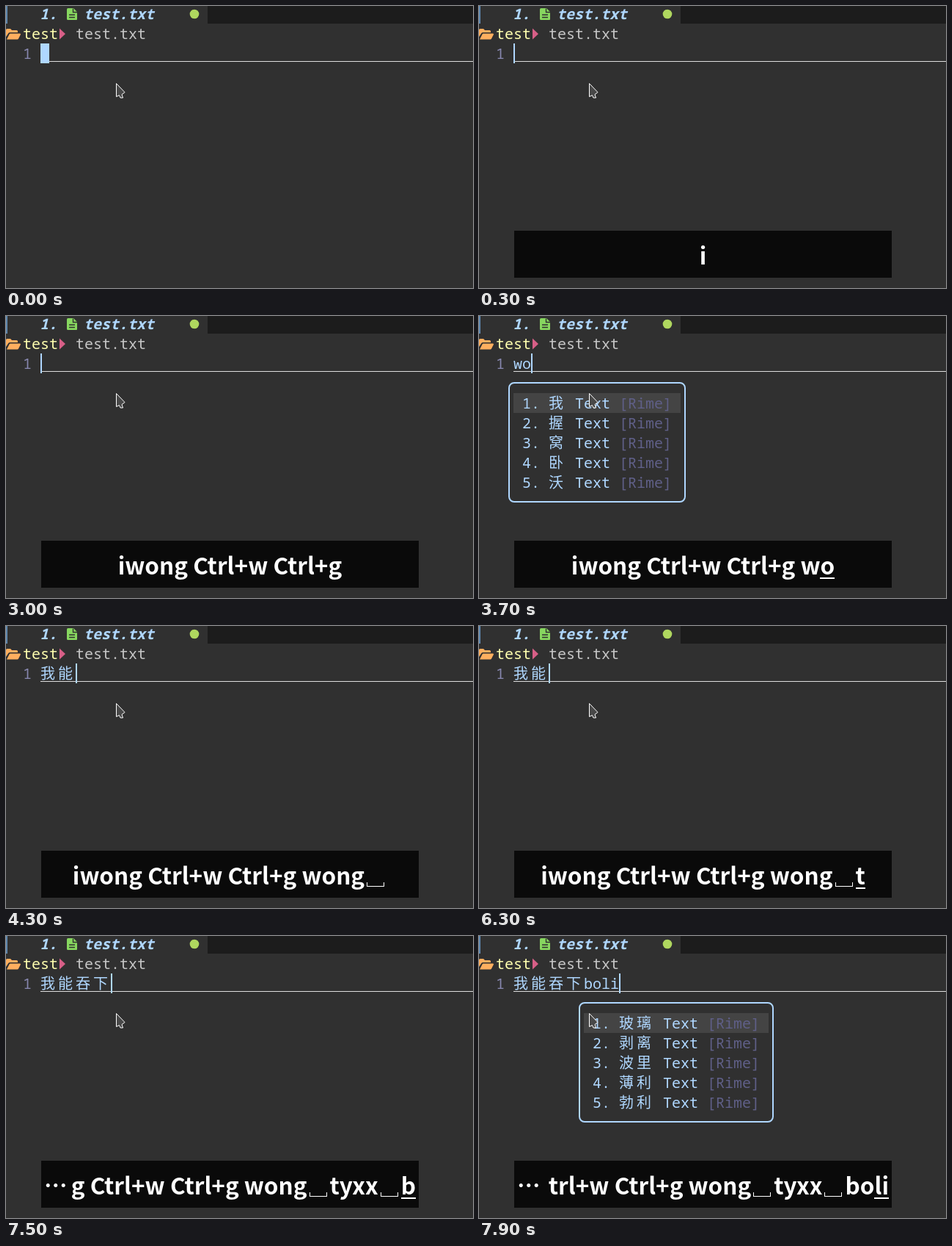
An HTML page that plays this animation: 637x384 px, repeating every 8 s.

```html
<!DOCTYPE html>
<html lang="en">
<head>
<meta charset="utf-8">
<title>Typing Chinese in an editor</title>
<style>
  html, body { margin: 0; width: 100%; height: 100%; overflow: hidden; background: #303030; }
  #stage {
    position: relative; width: 637px; height: 384px; overflow: hidden;
    background: #303030; color: #afd7ff;
    font: 20px/27px "Noto Sans Mono", "Noto Sans CJK SC", monospace;
  }
  #stage > * { position: absolute; white-space: pre; }
  .tabs { left: 275px; right: 0; top: 0; height: 24px; background: #1c1c1c; }
  .edge { left: 0; top: 0; width: 2px; height: 24px; background: #5f87af; }
  .tab { top: -3px; font-weight: bold; font-style: italic; }
  .path { top: 24px; }
  .num { left: 23px; top: 51px; color: #8787af; }
  .rule { left: 47px; right: 0; top: 75px; height: 1px; background: #dedede; }
  #line { left: 47px; top: 51px; height: 27px; }
  #caret { top: 51px; height: 27px; background: #afd7ff; }
  .han { letter-spacing: 4px; font-family: "Noto Sans CJK SC", sans-serif; line-height: 0; }
  #menu {
    top: 90px; height: 135px; padding: 13px 5px 12px; background: #303030;
    border: 2px solid #afd7ff; border-radius: 8px;
  }
  #menu div { height: 27px; }
  #menu div:first-child { background: #444; }
  #menu i { font-style: normal; color: #5f5f87; }
  #keys {
    left: 48px; top: 306px; width: 507px; height: 64px; padding: 0 4px;
    color: #fff; text-align: center;
    font: bold 31.5px/64px "Noto Sans CJK SC", sans-serif;
  }
  #keys.shown { background: #0a0a0a; }
  #keys.cut { text-align: right; }
  #keys.cut::before { content: "…"; position: absolute; left: 4px; }
  .hot { background: linear-gradient(#fff, #fff) 0 41px / 100% 2px no-repeat; }
  .gap {
    display: inline-block; box-sizing: border-box; width: 24px; height: 6px;
    margin: 0 4px -3px 3px; border: 1px solid #fff; border-top: 0;
  }
  svg { left: 0; top: 0; }
</style>
</head>
<body>
<div id="stage">
  <div class="tabs"></div>
  <div class="edge"></div>
  <div class="tab" style="left:46px">1.</div>
  <div class="tab" style="left:106px">test.txt</div>
  <div class="path" style="left:23px;color:#ffffaf">test</div>
  <div class="path" style="left:95px;color:#c6c6c6">test.txt</div>
  <div class="num">1</div>
  <div id="line"></div>
  <div class="rule"></div>
  <div id="caret"></div>
  <div id="menu"></div>
  <div id="keys"></div>
  <svg width="637" height="384">
    <circle cx="257" cy="11" r="6.3" fill="#afd75f"/>
    <path d="M84.5 3H92L97 8V18Q97 19 96 19H84.5Q83 19 83 17.5V4.5Q83 3 84.5 3Z" fill="#87d75f"/>
    <path d="M91.5 3.5V8.5H97M86 12H94M86 15.5H94" fill="none" stroke="#303030" stroke-width="1.4"/>
    <path d="M0 42V32.5Q0 31 1.5 31H6L8 33H14.5Q16 33 16 34.5V36H5.5Q4 36 3.3 37ZM1 45.5 4.5 38.5Q5 37.5 6 37.5H19Q20.5 37.5 19.8 39L17 44.5Q16.5 45.5 15.5 45.5Z" fill="#ffaf5f"/>
    <path d="M73 30.5 81 38 73 45.5Z" fill="#d75f87"/>
    <path d="M150.5 105.5V123.5L154.5 121.5 156 125H159.5L158 120.5 162 117.5Z" fill="#484848" stroke="#fff"/>
  </svg>
</div>
<script>
const LOOP = 8000, STEP = 100, HOLD = 200, CELL = 12, LEFT = 47;
const $ = id => document.getElementById(id);

// [time, key, starts a new group]
const keys = [
  [100, "i"], [1000, "w"], [1100, "o"], [1200, "n"], [1300, "g"],
  [2400, "Ctrl+w", 1], [2800, "Ctrl+g", 1],
  [3500, "w", 1], [3700, "o"], [3800, "n"], [3900, "g"], [4100, "␣"],
  [6300, "t"], [6500, "y"], [6700, "x"], [6900, "x"], [7100, "␣"],
  [7500, "b"], [7700, "o"], [7800, "l"], [7900, "i"]
];

// [time, committed text, pending input, candidates]
const edits = [
  [0, "", ""], [1100, "", "w"], [1200, "", "wo"], [1300, "", "won"], [1400, "", "wong"],
  [2500, "", ""],
  [3600, "", "w", "我 为 无 问 万"],
  [3700, "", "wo", "我 握 窝 卧 沃"],
  [3800, "", "won", "我能 我 握 窝 卧"],
  [4000, "", "wong", "我能 我 握 窝 卧"],
  [4100, "我能", ""],
  [6400, "我能", "t", "他 她 它 天 听"],
  [6500, "我能", "ty", "吞 屯 臀 囤 豚"],
  [6800, "我能", "tyx", "吞下 褪下 吞 屯 臀"],
  [7000, "我能", "tyxx", "吞下 褪下 吞 屯 臀"],
  [7200, "我能吞下", ""],
  [7600, "我能吞下", "b", "不 把 被 吧 比"],
  [7700, "我能吞下", "bo", "波 播 博 拨 伯"],
  [7800, "我能吞下", "bol", "玻璃 剥离 波里 薄利 勃利"],
  [7900, "我能吞下", "boli", "玻璃 剥离 波里 薄利 勃利"]
];

const han = s => `<span class="han">${s}</span>`;

function drawEditor(t) {
  const [, done, typed, list] = edits.findLast(e => e[0] <= t);
  const start = LEFT + done.length * 2 * CELL;
  $("line").innerHTML = han(done) + typed;
  $("caret").style.left = start + typed.length * CELL + "px";
  $("caret").style.width = (t < 100 ? CELL : 2) + "px";

  const menu = $("menu"), words = list ? list.split(" ") : [];
  const size = Math.max(...words.map(w => w.length));
  menu.hidden = !list;
  menu.style.left = start - 7 + "px";
  menu.innerHTML = words.map((w, n) =>
    `<div> ${n + 1}. ${han(w)}${"  ".repeat(size - w.length)} Text <i>[Rime]</i> </div>`).join("");
}

function drawKeys(t) {
  const down = keys.filter(k => k[0] <= t), box = $("keys");
  // once the row is full, letters drop off its start
  const cut = down.length > 16 ? down.length - 14 : 0;
  let skip = cut;
  const trim = s => {
    const rest = s.slice(skip);
    skip = Math.max(0, skip - s.length);
    return rest;
  };
  box.innerHTML = down.map(([time, key, fresh]) => {
    const space = fresh ? trim(" ") : "";
    const label = trim(key).replace("␣", '<b class="gap"></b>');
    return `${space}<span${t - time < HOLD ? ' class="hot"' : ""}>${label}</span>`;
  }).join("");
  box.classList.toggle("shown", t >= 300);
  box.classList.toggle("cut", cut > 0);
}

let last = -1;
function frame(now) {
  const t = Math.floor(now % LOOP / STEP) * STEP;
  if (t !== last) {
    last = t;
    drawEditor(t);
    drawKeys(t);
  }
  requestAnimationFrame(frame);
}
frame(performance.now());
</script>
</body>
</html>
```
